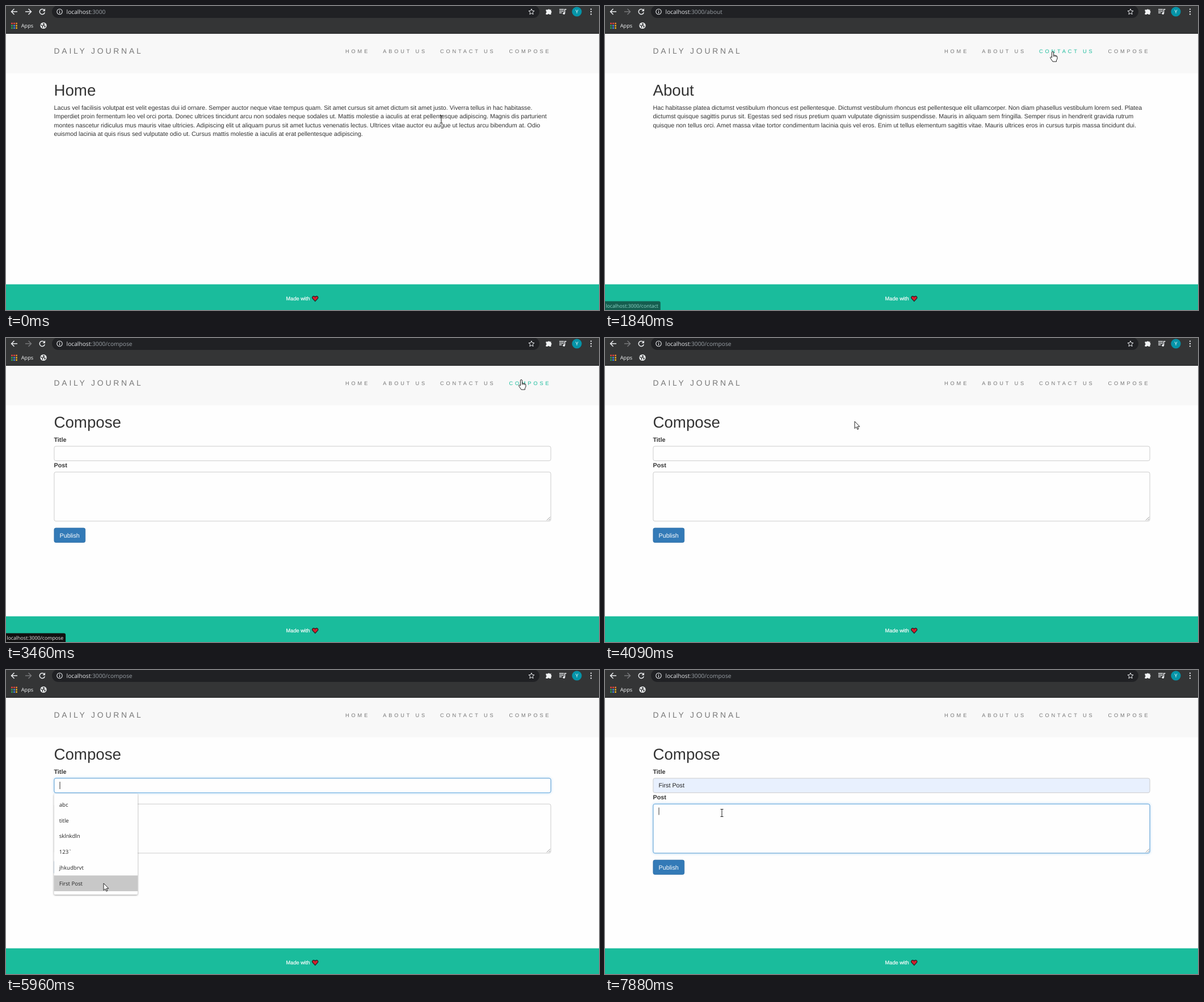
These frames come from a looping animation (1045x536 px, 8000 ms). An HTML page:

```html
<!DOCTYPE html>
<html lang="en">
<head>
<meta charset="utf-8">
<title>Daily Journal</title>
<style>
html, body { margin: 0; width: 100%; height: 100%; overflow: hidden; background: #fefefe; }
svg { display: block; width: 1045px; height: 536px; }
text { font: 10.757px "Liberation Sans", Arial, sans-serif; fill: #333; text-rendering: geometricPrecision; white-space: pre; }
.ui text, text.ui { font-family: "Open Sans", "Noto Sans", sans-serif; }
.nav text { font-size: 9.22px; letter-spacing: 3.842px; fill: #777; }
.nav text.brand { font-size: 13.83px; }
.nav text.hover { fill: #1abc9c; }
.field { fill: #fefefe; stroke: #ccc; }
.glow { fill: #66afe9; opacity: .6; filter: blur(2.6px); }
.focus { fill: none; stroke: #66afe9; }
.menu text { font-size: 9.6px; fill: #222; }
.line { fill: none; stroke: #e8eaed; stroke-width: 1.5; }
.cursor path { fill: #fff; stroke: #222; stroke-width: 1; stroke-linejoin: round; }
</style>
</head>
<body>
<svg viewBox="0 0 1045 536">
  <rect width="1045" height="536" fill="#fefefe"/>

  <!-- browser bar -->
  <g class="ui">
    <rect width="1045" height="49" fill="#343536"/>
    <rect y="48" width="1045" height="1" fill="#262728"/>
    <rect x="81" y="-1" width="859" height="22" rx="11" fill="#202124"/>
    <path class="line" d="M20 10H9.8M14.5 5L9.5 10L14.5 15"/>
    <path class="line" id="forward" d="M34 10H44.2M39.5 5L44.5 10L39.5 15"/>
    <g id="reload"><path class="line" d="M67.3 7A4.6 4.6 0 1 0 68.3 11.3"/><path d="M69 4.6V9.2H64.4z" fill="#e8eaed"/></g>
    <path class="line" id="stop" d="M59.8 5.8L68.2 14.2M68.2 5.8L59.8 14.2"/>
    <circle class="line" cx="94.5" cy="10" r="4.7" style="stroke-width:1.1"/>
    <path class="line" d="M94.5 7V8.3M94.5 9.3V13" style="stroke-width:1.2"/>
    <text x="106.6" y="13.7" style="font-size:10.2px;fill:#e8eaed">localhost<tspan id="url" fill="#9aa0a6"></tspan></text>
    <path class="line" style="stroke-width:1" d="M926 5L927.4 8.4L931 8.7L928.2 11.1L929.1 14.7L926 12.8L922.9 14.7L923.8 11.1L921 8.7L924.6 8.4z"/>
    <path fill="#f1f3f4" d="M952 6.5H955A1.6 1.6 0 0 1 958 6.5H960.5V9A1.6 1.6 0 0 1 960.5 12V15H957.6A1.6 1.6 0 0 0 954.6 15H951.5V12.2A1.6 1.6 0 0 0 951.5 9.2V6.5z"/>
    <path class="line" d="M975 6H983M975 9H983M975 12H979.5M984.6 13V6H987.5"/>
    <circle cx="983.2" cy="13" r="2" fill="#e8eaed"/>
    <circle cx="1006" cy="10" r="8.6" fill="#0594a8"/>
    <text x="1006" y="13.2" text-anchor="middle" style="font-size:9px;fill:#fff">Y</text>
    <path d="M1031 5.6h.01M1031 10h.01M1031 14.4h.01" stroke="#e8eaed" stroke-width="2.4" stroke-linecap="round"/>
    <g id="apps"></g>
    <text x="26.7" y="38.2" style="font-size:9.2px;fill:#f1f3f4">Apps</text>
    <circle cx="66" cy="34.5" r="5.6" fill="#f1f3f4"/>
    <path d="M61.6 33L64.5 35.5V38.5M65 30.6L67.5 32L65.5 33.8L69 35.5L68 38" fill="none" stroke="#343536" stroke-width="1.5"/>
  </g>

  <!-- site header and footer -->
  <rect y="49" width="1045" height="69.5" fill="#f8f8f8"/>
  <g class="nav" id="nav"><text class="brand" x="84.5" y="84.4">DAILY JOURNAL</text></g>
  <rect y="490.7" width="1045" height="46" fill="#1abc9c"/>
  <text x="493.6" y="519.2" style="font-size:9.22px;fill:#fff;stroke:#fff;stroke-width:.2">Made with</text>
  <path d="M544.8 520.6L540.4 516Q538.8 513.8 540.4 512.3Q542.8 510.5 544.8 513.2Q546.8 510.5 549.2 512.3Q550.8 513.8 549.2 516z" fill="#d3202f" stroke="#222" stroke-width="1.1"/>

  <!-- page -->
  <text id="heading" x="84.5" y="158.3" style="font-size:27.66px"></text>
  <g id="lines"></g>
  <g id="form">
    <text x="84.5" y="182.8" font-weight="bold" style="font-weight:bold">Title</text>
    <text x="84.5" y="228" style="font-weight:bold">Post</text>
    <g id="titleBox"></g>
    <g id="postBox"></g>
    <path d="M953 321.5L959 315.5M956.5 321.5L959 319" stroke="#777" stroke-width=".8"/>
    <text id="entry" x="94.5" y="207.2" style="fill:#222">First Post</text>
    <rect x="84.9" y="335" width="54.8" height="25.5" rx="3" fill="#337ab7" stroke="#2e6da4" stroke-width=".8"/>
    <text x="94.5" y="351.7" style="fill:#fff">Publish</text>
    <rect id="caret" width="1" height="13" fill="#333"/>
    <g id="menu" class="ui menu">
      <rect x="84.5" y="218" width="147.5" height="178" rx="2" fill="#fefefe" style="filter:drop-shadow(0 1px 1.5px rgba(0,0,0,.4))"/>
      <rect id="mark" x="84.5" width="147.5" height="27.7" fill="#c8c8c8"/>
    </g>
  </g>

  <g id="status" class="ui">
    <path id="statusBox" fill="#111"/>
    <text id="statusText" x="1.2" y="531.7" style="font-size:8.8px;fill:#eee"></text>
  </g>
  <g id="cursor" class="cursor">
    <path id="arrow" d="M0 0V12.5L2.9 9.8L4.9 14.2L6.8 13.4L4.9 9.2H8.8z"/>
    <path id="hand" d="M0 .5Q1.5 .5 1.5 2V6.5L6.5 7.7Q8 8.2 8 9.7V13L6.5 15.8V18H0L-4 12Q-4.8 10.6-3.8 10T-1.5 11V2Q-1.5 .5 0 .5zM1.5 6.5V9.5M3.7 7.2V9.5M6 7.7V10"/>
    <path id="ibeam" style="fill:none" d="M-2.5-6.5H2.5M-2.5 6.5H2.5M0-6.5V6.5"/>
  </g>
</svg>

<script>
const el = id => document.getElementById(id);
const show = (id, on) => el(id).style.display = on ? '' : 'none';
const add = (id, markup) => el(id).insertAdjacentHTML('beforeend', markup);
const within = (v, a, b) => v >= a && v < b;
const lastOf = (list, t) => list.filter(e => e[0] <= t).pop();

const pages = {
  home: ['Home',
    'Lacus vel facilisis volutpat est velit egestas dui id ornare. Semper auctor neque vitae tempus quam. Sit amet cursus sit amet dictum sit amet justo. Viverra tellus in hac habitasse.',
    'Imperdiet proin fermentum leo vel orci porta. Donec ultrices tincidunt arcu non sodales neque sodales ut. Mattis molestie a iaculis at erat pellentesque adipiscing. Magnis dis parturient',
    'montes nascetur ridiculus mus mauris vitae ultricies. Adipiscing elit ut aliquam purus sit amet luctus venenatis lectus. Ultrices vitae auctor eu augue ut lectus arcu bibendum at. Odio',
    'euismod lacinia at quis risus sed vulputate odio ut. Cursus mattis molestie a iaculis at erat pellentesque adipiscing.'],
  about: ['About',
    'Hac habitasse platea dictumst vestibulum rhoncus est pellentesque. Dictumst vestibulum rhoncus est pellentesque elit ullamcorper. Non diam phasellus vestibulum lorem sed. Platea',
    'dictumst quisque sagittis purus sit. Egestas sed sed risus pretium quam vulputate dignissim suspendisse. Mauris in aliquam sem fringilla. Semper risus in hendrerit gravida rutrum',
    'quisque non tellus orci. Amet massa vitae tortor condimentum lacinia quis vel eros. Enim ut tellus elementum sagittis vitae. Mauris ultrices eros in cursus turpis massa tincidunt dui.'],
  contact: ['Contact',
    'Scelerisque eleifend donec pretium vulputate sapien. Rhoncus urna neque viverra justo nec ultrices. Arcu dui vivamus arcu felis bibendum. Consectetur adipiscing elit duis tristique.',
    'Risus viverra adipiscing at in tellus integer feugiat. Sapien nec sagittis aliquam malesuada bibendum arcu vitae. Consequat interdum varius sit amet mattis. Iaculis nunc sed augue',
    'lacus. Interdum posuere lorem ipsum dolor sit amet consectetur adipiscing elit. Pulvinar elementum integer enim neque. Ultrices gravida dictum fusce ut placerat orci nulla. Mauris in',
    'aliquam sem fringilla ut morbi tincidunt. Tortor posuere ac ut consequat semper viverra nam libero.'],
  compose: ['Compose']
};

// address change, content change, end of loading
const visits = [[0, 0, 0, 'home'], [750, 820, 820, 'about'], [2240, 2300, 2300, 'contact'], [3300, 3380, 3460, 'compose']];
const statuses = [[0, '', 0], [290, 'about', .55], [370, 'about', 1], [1240, 'about', .5], [1320, '', 0],
  [1840, 'contact', .55], [1930, 'contact', 1], [2616, 'compose', 1], [3900, 'compose', .5], [3980, '', 0]];
// first step, last step, step count, x, y
const moves = [[70, 140, 2, 667, 73], [290, 370, 2, 688, 71], [590, 590, 1, 681, 67], [1050, 1370, 5, 730, 115],
  [1450, 1690, 4, 789, 80], [2070, 2070, 1, 783, 71], [2540, 2690, 3, 918, 68], [2766, 2920, 3, 908, 73],
  [3760, 4090, 5, 440, 147], [4167, 4530, 6, 408, 204], [4620, 4620, 1, 408, 205.5],
  [5550, 5960, 6, 172, 376], [6020, 6020, 1, 168, 371], [6490, 6490, 1, 160, 367], [7020, 7420, 6, 206, 252]];
const links = [['HOME', 598.1], ['ABOUT US', 664.2], ['CONTACT US', 765], ['COMPOSE', 886.4]];
const rows = ['abc', 'title', 'sklnkdln', '123`', 'jhkudbrvt', 'First Post'];
const rowTop = 223.6, rowStep = 27.7;

links.forEach(([label, x]) => add('nav', `<text class="link" x="${x}" y="82.8">${label}</text>`));
rows.forEach((label, i) => add('menu', `<text x="93.7" y="${241 + i * rowStep}">${label}</text>`));
['#e8453c', '#e8453c', '#f0862f', '#34a853', '#4285f4', '#f2b61e', '#34a853', '#4285f4', '#f2b61e'].forEach((c, i) =>
  add('apps', `<rect x="${9.2 + i % 3 * 4}" y="${29.5 + (i / 3 | 0) * 4}" width="2.6" height="2.6" fill="${c}"/>`));
[['titleBox', 190.9, 25.5], ['postBox', 236.3, 86.6]].forEach(([id, y, h]) => {
  const box = name => `<rect class="${name}" x="84.9" y="${y}" width="875.2" height="${h}" rx="3"/>`;
  add(id, `<g class="lit">${box('glow')}</g>${box('field')}<g class="lit">${box('focus')}</g>`);
});
const linkEls = [...document.querySelectorAll('.link')];

function pointer(t) {
  let x = 767, y = 200;
  for (const [start, end, n, toX, toY] of moves) {
    if (t < start) break;
    const gap = n > 1 ? (end - start) / (n - 1) : 1;
    const k = Math.min(n, Math.floor((t - start) / gap + 1e-6) + 1) / n;
    x += (toX - x) * k;
    y += (toY - y) * k;
  }
  return [x, y];
}

function light(id, amount) {
  document.querySelectorAll(`#${id} .lit`).forEach(g => g.style.opacity = amount);
}

let shownPage;
function showPage(name) {
  if (name === shownPage) return;
  shownPage = name;
  const [title, ...lines] = pages[name];
  el('heading').textContent = title;
  el('lines').innerHTML = lines.map((s, i) => `<text x="84.5" y="${182.8 + i * 15.37}">${s}</text>`).join('');
  show('form', name === 'compose');
}

function draw(t) {
  const visit = lastOf(visits, t);
  const page = visits.filter(v => v[1] <= t).pop()[3];
  showPage(page);
  el('url').textContent = ':3000' + (visit[3] === 'home' ? '' : '/' + visit[3]);
  el('forward').style.stroke = t < 750 ? '#e8eaed' : '#77787a';
  show('stop', t < visit[2]);
  show('reload', t >= visit[2]);

  const [, target, alpha] = lastOf(statuses, t);
  el('status').style.opacity = alpha;
  el('statusText').textContent = 'localhost:3000/' + target;
  const right = el('statusText').getComputedTextLength() + 5;
  el('statusBox').setAttribute('d', `M0 520.6H${right - 3}q3 0 3 3V536H0z`);

  // form
  const menuOpen = within(t, 5040, 6660);
  const toPost = t < 7740 ? 0 : Math.min(1, (Math.floor((t - 7740) / 70) + 1) / 3);
  const toTitle = t < 5000 ? 0 : Math.min(1, .4 + Math.max(0, t - 5080) / 500);
  light('titleBox', toTitle * (1 - toPost));
  light('postBox', toPost);
  document.querySelector('#titleBox .field').style.fill = t < 7740 ? '' : '#e8f0fe';
  show('entry', t >= 6660);
  show('menu', menuOpen);
  const inPost = t >= 7740;
  show('caret', within(t, 5000, 5550) || within(t, 5830, 6330) || within(t, 6660, 7160) || inPost);
  el('caret').setAttribute('x', within(t, 6660, 7740) ? 140.2 : 94.5);
  el('caret').setAttribute('y', inPost ? 242.5 : 197);

  // pointer and what lies under it
  const [x, y] = pointer(t);
  const overMenu = menuOpen && within(x, 84, 232) && within(y, 218, 396);
  const row = Math.floor((y - rowTop) / rowStep);
  show('mark', overMenu && within(row, 0, rows.length));
  el('mark').setAttribute('y', rowTop + row * rowStep + .2);
  const overNav = y < 100;
  const overText = page === 'home' ? within(y, 172, 232)
    : page === 'compose' && (within(y, 190, 217) || within(y, 236, 323));
  const kind = overNav ? 'hand' : overText && !overMenu ? 'ibeam' : 'arrow';
  ['arrow', 'hand', 'ibeam'].forEach(id => show(id, id === kind));
  el('cursor').setAttribute('transform', `translate(${x} ${y})`);
  const hovered = links.filter(l => l[1] - 11.5 <= x).length - 1;
  linkEls.forEach((link, i) => link.classList.toggle('hover', overNav && i === hovered));
}

function frame() {
  draw(performance.now() % 8000);
  requestAnimationFrame(frame);
}
frame();
</script>
</body>
</html>
```
